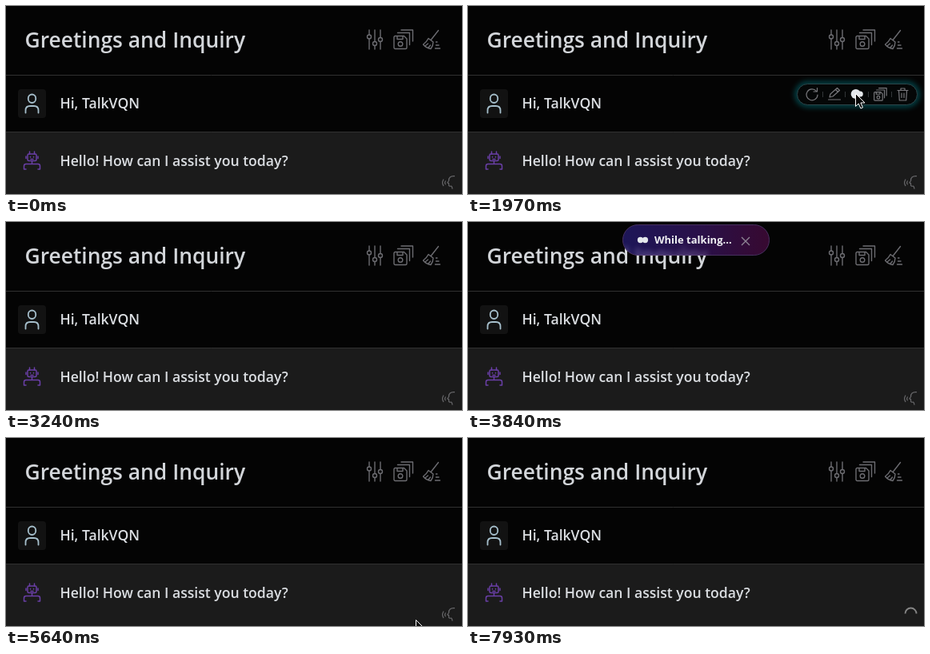
Animation, 570 px wide and 235 px high, one loop 8000 ms. Source, as an HTML page:

```html
<!DOCTYPE html>
<html lang="en">
<head>
<meta charset="utf-8">
<title>Chat toolbar</title>
<style>
html, body { margin: 0; width: 100%; height: 100%; overflow: hidden; background: #040404; }
svg { display: block; width: 570px; height: 235px; }
text { font-family: "Open Sans", "Noto Sans", sans-serif; font-weight: 600; }
.icon { fill: none; stroke: currentColor; stroke-width: 1.4; stroke-linecap: round; stroke-linejoin: round; }
.grey { color: #6c6c71; }
.small { color: #77777b; stroke-width: 1.2; }
</style>
</head>
<body>
<svg viewBox="0 0 570 235" xmlns="http://www.w3.org/2000/svg">
  <defs>
    <g id="save">
      <path d="M2.500 8.500h11l3.500 3.500v11a1.500 1.500 0 0 1-1.500 1.500h-13A1.500 1.500 0 0 1 1 23V10A1.500 1.500 0 0 1 2.500 8.500zM5 8.500v4h7v-4M5.500 4.500h15v15M10 1h14.500v14"/>
      <circle cx="9" cy="18.500" r="2.800"/>
    </g>
    <g id="voice">
      <path d="M15.500.7C10.500.2 8.300 3 8.600 6.200L6.800 9l1.700.6v2.200c0 1.400 1.200 1.600 3.200 1.400q1 .8 1.200 3M4.300 6.800q-1.400 2 0 4M1.800 5q-2.400 3.800 0 7.600"/>
    </g>
    <g id="dots">
      <path stroke="#e4e8ec" stroke-width="4.500"/>
      <circle fill="#e4e8ec"/>
      <circle fill="#e4e8ec"/>
    </g>
    <linearGradient id="toastFill">
      <stop offset="0" stop-color="#1d1658"/>
      <stop offset=".55" stop-color="#2a1048"/>
      <stop offset="1" stop-color="#370930"/>
    </linearGradient>
    <clipPath id="pill"><rect x="194" y="4" width="183" height="38" rx="19"/></clipPath>
    <filter id="blur" x="-20%" y="-60%" width="140%" height="220%"><feGaussianBlur stdDeviation="3.500"/></filter>
  </defs>

  <rect width="570" height="235" fill="#040404"/>
  <rect y="157" width="570" height="78" fill="#1b1b1b"/>
  <path d="M0 86.500H570M0 157.500H570" stroke="#303030"/>

  <text x="23.500" y="52" font-size="26.400" fill="#d3d6da">Greetings and Inquiry</text>
  <text x="67.500" y="128" font-size="17.600" fill="#dadde1">Hi, TalkVQN</text>
  <text x="67.500" y="200" font-size="17.600" fill="#dadde1">Hello! How can I assist you today?</text>

  <rect x="15" y="104" width="35" height="36" rx="4" fill="#121212"/>
  <g class="icon" color="#a6bfcc" style="stroke-width:1.800">
    <rect x="27.800" y="110.500" width="9.400" height="10.500" rx="4.700"/>
    <path d="M24.500 133.500v-3q0-5.500 5.500-5.500h5q5.500 0 5.500 5.500v3"/>
  </g>
  <g class="icon" color="#6a3fa6" style="stroke-width:1.500">
    <rect x="27" y="185" width="11" height="8.500" rx="1.500"/>
    <path d="M29.500 185v-3M35.500 185v-3M25 188v2.500M40 188v2.500M30.500 188.500v.5M34.500 188.500v.5M31 191.500h3M32.500 194v2.500M22.500 204v-4q0-2.500 2.500-2.500h15q2.500 0 2.500 2.500v4M22.500 204h2.500M40 204h2.500"/>
  </g>

  <g class="icon grey">
    <path d="M454 30v6M454 41v13M461 30v14.500M461 49.500v4.500M468 30v9.500M468 44.500v9.500"/>
    <circle cx="454" cy="38.500" r="2.500"/><circle cx="461" cy="47" r="2.500"/><circle cx="468" cy="42" r="2.500"/>
    <use href="#save" x="484" y="29"/>
    <path d="M540.500 30.500l-9 11.500M528 40.500l6 4.500M528 40.500q-2.500 5-6.500 7.500 3.500 4.500 9.500 5.500 3-4 3-8.500M524.500 49.500l3-2.500M528 52l2.500-3M537.500 45h1.500M537.500 49h3.500M536.500 53h6"/>
  </g>
  <path id="spinner" d="M546.500 219.500a7 7 0 0 1 14 0" fill="none" stroke="#858585" stroke-width="1.900"/>

  <g id="bar">
    <rect id="glow" x="411.500" y="97.500" width="150" height="26" rx="13" fill="none" stroke="#107078" stroke-width="4" filter="url(#blur)"/>
    <rect id="rim" x="411.500" y="97.500" width="150" height="26" rx="13" fill="#050707" stroke="#2c4549"/>
    <path d="M443.500 107v7M471.500 107v7M500.500 107v7M529.500 107v7" stroke="#333639"/>
    <g class="icon small">
      <path d="M435.500 106.500a7 7 0 1 0 1.500 4.500M436.500 102.500v4.500h-4.500"/>
      <path d="M452 114l1-4 8.500-7.500 3 3-8.500 7.500zM459.500 104.500l3 3M450.500 117h15"/>
      <use href="#save" transform="translate(507 102) scale(.66)" style="stroke-width:1.800"/>
      <path d="M537 105.500h13M541 105.500v-2.500h5v2.500M538.500 105.500l.8 12.500h8.400l.8-12.500M542 109v5.500M545 109v5.500"/>
    </g>
    <g id="talk" class="icon small"><use href="#voice" x="478" y="102"/></g>
    <g id="barDots"><use href="#dots" transform="translate(487.500 110) scale(1.120)"/></g>
  </g>

  <g id="toast">
    <rect x="193.500" y="3.500" width="183" height="38" rx="19" fill="url(#toastFill)" stroke="#47305f"/>
    <g clip-path="url(#pill)"><g id="behind">
      <text x="23.500" y="52" font-size="26.400" fill="#b5a4e0" opacity=".55" filter="url(#blur)">Greetings and Inquiry</text>
    </g></g>
    <use href="#dots" transform="translate(218.500 22.500) scale(.85)"/>
    <text x="233" y="27" font-size="13" style="font-weight:700" fill="#f0f0f4">While talking...</text>
    <path d="M342 19l10 10M352 19l-10 10" stroke="#8d8494" stroke-width="1.400"/>
  </g>

  <circle id="press" r="12" fill="#c8ba0c" opacity=".74"/>
  <g id="corner" class="icon" color="#68686b" style="stroke-width:1.200"><use href="#voice" x="545" y="212"/></g>
  <path id="cursor" d="M.5.5v16l3.700-3.500 2.700 6 2.600-1.100-2.600-5.900h5.100z" fill="#080808" stroke="#fff"/>
</svg>
<script>
const LOOP = 8000;
const $ = id => document.getElementById(id);
const clamp = v => Math.max(0, Math.min(1, v));
const ramp = (t, a, b) => clamp((t - a) / (b - a));
const ease = u => u * u * (3 - 2 * u);
const within = (t, a, b) => t >= a && t < b;
const show = (id, on) => { $(id).style.display = on ? "" : "none"; };

// Each point: time, x, y
const visits = [
  [[130, 479, 196], [470, 463, 140], [820, 441, 111], [950, 441, 111], [1300, 484, 109],
   [2390, 484, 109], [2880, 491, 125], [2980, 491, 125], [3200, 498, 236]],
  [[5640, 512, 227], [6130, 552, 220], [7000, 552, 220], [7200, 556, 236]]
];

function cursorAt(t) {
  const path = visits.find(p => within(t, p[0][0], p[p.length - 1][0]));
  if (!path) return null;
  const i = path.findIndex(p => p[0] > t);
  const [a, b] = [path[i - 1], path[i]];
  const u = ease(ramp(t, a[0], b[0]));
  return [a[1] + (b[1] - a[1]) * u, a[2] + (b[2] - a[2]) * u];
}

function drawDots(t) {
  const p = (t - 1889) / 650 * 2 * Math.PI;
  const x = 3.5 * Math.cos(p), s = 1.6 * Math.sin(p);
  const [link, a, b] = $("dots").children;
  link.setAttribute("d", `M${-x} 0H${x}`);
  a.setAttribute("cx", -x);
  a.setAttribute("r", 4.3 + s);
  b.setAttribute("cx", x);
  b.setAttribute("r", 4.3 - s);
}

function draw(t) {
  const pos = cursorAt(t);
  show("cursor", pos);
  if (pos) $("cursor").setAttribute("transform", `translate(${pos})`);

  const firstPress = within(t, 1630, 1800);
  show("press", firstPress || within(t, 6460, 6640));
  $("press").setAttribute("transform", firstPress ? "translate(484 110)" : "translate(552 220)");

  const barIn = ramp(t, 400, 560) * (1 - ramp(t, 3100, 3230));
  const glow = ramp(t, 680, 820) * (1 - ramp(t, 2600, 2880));
  show("bar", barIn > 0);
  $("bar").setAttribute("opacity", barIn);
  $("glow").setAttribute("opacity", glow);
  $("rim").setAttribute("stroke", glow > .5 ? "#2c4549" : "#303436");
  show("talk", t < 1840);
  show("barDots", t >= 1840);
  $("talk").style.color = within(t, 1250, 1840) ? "#b4b8bc" : "";
  drawDots(t);

  const drop = ease(ramp(t, 3580, 3770)) * (1 - ease(ramp(t, 4140, 4320)));
  const lift = -46 * (1 - drop);
  show("toast", drop > 0);
  $("toast").setAttribute("transform", `translate(0 ${lift})`);
  $("behind").setAttribute("transform", `translate(0 ${-lift})`);

  const busy = t >= 6700;
  show("corner", !busy);
  show("spinner", busy);
  $("corner").style.color = within(t, 6060, 6700) ? "#b9b484" : "";
  $("spinner").setAttribute("transform", `rotate(${(t - 7930) / 800 * 360} 553.5 219.5)`);
}

function tick(now) {
  draw(now % LOOP);
  requestAnimationFrame(tick);
}
draw(0);
requestAnimationFrame(tick);
</script>
</body>
</html>
```
